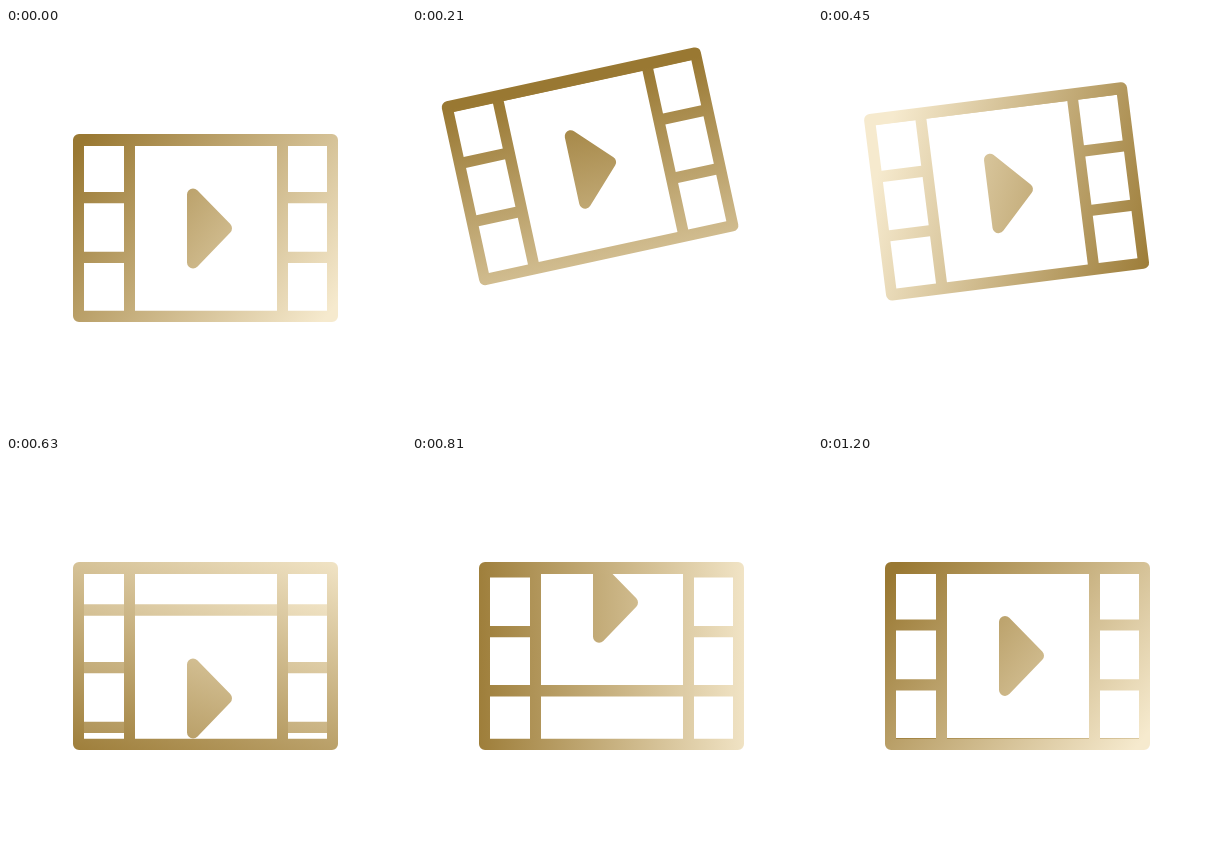
Animation of 400 by 400 pixels, one loop 3260 ms. Source, as an HTML page:

```html
<!DOCTYPE html>
<html lang="en">
<head>
<meta charset="utf-8">
<title>Film strip</title>
<style>
  html, body { margin: 0; width: 100%; height: 100%; overflow: hidden; background: #fff; }
  svg { display: block; width: 100vw; height: 100vh; }
</style>
</head>
<body>
<svg viewBox="0 0 400 400">
  <defs>
    <linearGradient id="gold" gradientUnits="userSpaceOnUse" x1="50" y1="200" x2="350" y2="200">
      <stop offset="0" stop-color="#997832"/>
      <stop offset="1" stop-color="#f6eace"/>
    </linearGradient>
    <clipPath id="window"><rect x="72" y="112" width="255" height="176"/></clipPath>
    <g id="tile">
      <path d="M72 106.2H327V117.8H72Z"/>
      <path d="M72 164H124V175.2H72ZM276 164H327V175.2H276Z"/>
      <path d="M72 223.8H124V235H72ZM276 223.8H327V235H276Z"/>
      <path d="M187 166.5L220 200.3L187 234.5Z" stroke="url(#gold)" stroke-width="12" stroke-linejoin="round"/>
    </g>
  </defs>
  <g id="film" fill="url(#gold)">
    <g clip-path="url(#window)">
      <g id="strip">
        <use href="#tile"/>
        <use href="#tile" y="-176.5"/>
      </g>
    </g>
    <path fill-rule="evenodd" d="M73 106H326a6 6 0 0 1 6 6V288a6 6 0 0 1 -6 6H73a6 6 0 0 1 -6 -6V112a6 6 0 0 1 6 -6Z
      M78 118H118V282.7H78Z M129 118H271V282.7H129Z M282 118H321V282.7H282Z"/>
  </g>
</svg>
<script>
  const LOOP = 3260, STEP = 30, END = 1200;
  const SWING = 540, TURN = 1080, TILT = 12.9;
  const PIVOT = '-98.5 269';
  const film = document.getElementById('film');
  const strip = document.getElementById('strip');
  const gold = document.getElementById('gold');

  // Scroll keys: time, offset, speed in px per ms
  const keys = [[525, 0, .35], [630, 42, .42], [720, 79, .42], [960, 172.5, .03], [1200, 175.9, 0]];

  function scroll(t) {
    if (t <= keys[0][0]) return 0;
    const i = keys.findIndex(k => t <= k[0]);
    const [t0, y0, v0] = keys[i - 1], [t1, y1, v1] = keys[i];
    const d = t1 - t0, s = (t - t0) / d, r = 1 - s;
    return y0 * r * r * (1 + 2 * s) + v0 * d * s * r * r
         + y1 * s * s * (3 - 2 * s) - v1 * d * s * s * r;
  }

  // Cubic easing with flat ends, control points at x1 and x2
  function ease(p, x1, x2) {
    let lo = 0, hi = 1, s = .5;
    for (let i = 0; i < 24; i++) {
      s = (lo + hi) / 2;
      const x = 3 * (1 - s) * s * ((1 - s) * x1 + s * x2) + s * s * s;
      if (x < p) lo = s; else hi = s;
    }
    return s * s * (3 - 2 * s);
  }

  function draw(t) {
    const p = Math.min(t / SWING, 1);
    const tilt = TILT * 4 * p * (1 - p);
    const turn = 38 + 360 * ease(Math.min(t / TURN, 1), .33, .55);
    film.setAttribute('transform', `rotate(${-tilt} ${PIVOT})`);
    strip.setAttribute('transform', `translate(0 ${scroll(t)})`);
    // Undo the tilt so the light stays fixed to the stage
    gold.setAttribute('gradientTransform', `rotate(${tilt} ${PIVOT}) rotate(${turn} 200 200)`);
  }

  const start = performance.now();
  function tick() {
    const t = (performance.now() - start) % LOOP;
    draw(Math.min(Math.floor(t / STEP) * STEP, END));
    requestAnimationFrame(tick);
  }
  tick();
</script>
</body>
</html>
```
